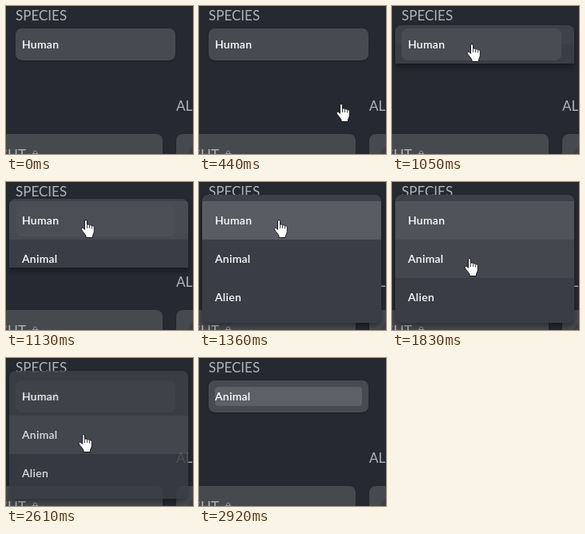
Recreate the animation shown at these times as an HTML page. Size 234 by 185 pixels, loop 4160 ms.

```html
<!DOCTYPE html>
<html lang="en">
<head>
<meta charset="utf-8">
<title>Species select</title>
<style>
  html, body { margin: 0; width: 100%; height: 100%; overflow: hidden; background: #242932; }
  .stage {
    position: relative; width: 234px; height: 185px; overflow: hidden;
    background: #242932; color: #fff;
    font: 600 14px Lato, "Open Sans", sans-serif; letter-spacing: .25px;
  }
  .stage * { position: absolute; box-sizing: border-box; white-space: nowrap; }

  /* Every animated part shares one 4160 ms loop. */
  .anim { animation: 4160ms step-end infinite; }

  .label { font-size: 17px; font-weight: 400; line-height: 20px; letter-spacing: 0; color: #b2b4b8; }
  .card, .field { border-radius: 8px; box-shadow: 0 1px 2px rgba(0, 0, 0, .2); }
  .card { top: 160px; height: 60px; background: #46494e; }
  .knob { left: 14px; top: 14px; width: 28px; height: 28px; border-radius: 50%; background: #3e4147; }

  .field { left: 12px; top: 28px; width: 200px; height: 40px; background: #474a50; }
  .field span { left: 8px; line-height: 40px; }
  .focus { left: 8px; top: 8px; width: 184px; height: 24px; border-radius: 4px; background: #5d6067; animation-name: focus; }
  .before { animation-name: before; }
  .after { animation-name: after; }

  .menu {
    left: 4px; width: 224px; overflow: hidden;
    background: linear-gradient(#3e4149 50%, #3a3d45 0);
    box-shadow: 0 4px 6px rgba(0, 0, 0, .35);
    animation-name: menu;
  }
  .list { left: 0; width: 224px; height: 144px; animation-name: list; }
  .ghost { left: 8px; top: 4px; width: 200px; height: 40px; border-radius: 8px; background: #494c52; animation-name: ghost; }
  .row { left: 0; width: 224px; height: 48px; padding-left: 16px; line-height: 48px; }
  .row:nth-child(2) { top: 0; animation-name: first; }
  .row:nth-child(3) { top: 48px; animation-name: second; }
  .row:nth-child(4) { top: 96px; background: #3a3d45; }

  .pointer { left: 0; top: 0; width: 0; height: 0; animation-name: move; }
  .pulse { left: -12px; top: -12px; width: 24px; height: 24px; border-radius: 50%; background: #a0a12d; animation-name: pulse; }
  .hand { left: -8px; top: -2px; overflow: visible; }

  @keyframes move {
    0% { transform: translate(203px, 147px); opacity: 0; }
    8.65% { transform: translate(203px, 147px); opacity: 1; animation-timing-function: steps(4); }
    16.1% { transform: translate(99px, 47px); opacity: 1; }
    40.38% { transform: translate(98px, 63px); opacity: 1; animation-timing-function: steps(2); }
    43.98% { transform: translate(96px, 95px); opacity: 1; }
    68.26%, 100% { transform: translate(96px, 95px); opacity: 0; }
  }
  @keyframes pulse {
    0% { opacity: 0; }
    21.63% { opacity: 1; }
    25.23% { opacity: 0; }
    60.81% { opacity: 1; }
    62.73%, 100% { opacity: 0; }
  }
  /* The lower corners stay square until the panel is fully open. */
  @keyframes menu {
    0% { top: 24px; height: 48px; opacity: 0; border-radius: 8px 8px 0 0; }
    25.23% { top: 24px; height: 48px; opacity: 1; border-radius: 8px 8px 0 0; }
    27.1% { top: 21px; height: 86px; opacity: 1; border-radius: 8px 8px 0 0; }
    28.95% { top: 18px; height: 126px; opacity: 1; border-radius: 8px 8px 0 0; }
    30.82% { top: 17px; height: 150px; opacity: 1; border-radius: 8px 8px 0 0; }
    32.69%, 60.81% { top: 16px; height: 160px; opacity: 1; border-radius: 8px; }
    62.73% { top: 16px; height: 160px; opacity: .85; border-radius: 8px; }
    64.66% { top: 16px; height: 160px; opacity: .5; border-radius: 8px; }
    66.58% { top: 16px; height: 160px; opacity: .2; border-radius: 8px; }
    68.26%, 100% { top: 16px; height: 160px; opacity: 0; border-radius: 8px; }
  }
  /* Offsets the panel's rise so that the rows stay put. */
  @keyframes list {
    0% { top: 0; }
    27.1% { top: 3px; }
    28.95% { top: 6px; }
    30.82% { top: 7px; }
    32.69%, 100% { top: 8px; }
  }
  @keyframes ghost {
    0% { opacity: 1; }
    27.1% { opacity: .6; }
    28.95% { opacity: .25; }
    30.82%, 100% { opacity: 0; }
  }
  @keyframes first {
    0% { background: #595c6300; }
    27.1% { background: #595c6366; }
    28.95% { background: #595c63b3; }
    30.82% { background: #595c63e6; }
    32.69% { background: #595c63; }
    43.98% { background: #50535a; }
    60.81%, 100% { background: #3e4149; }
  }
  @keyframes second {
    0% { background: #3a3d45; }
    43.98% { background: #44474e; }
    60.81%, 100% { background: #494c53; }
  }
  @keyframes before { 0% { opacity: 1; } 62.73%, 100% { opacity: 0; } }
  @keyframes after { 0% { opacity: 0; } 62.73%, 100% { opacity: 1; } }
  @keyframes focus { 0% { opacity: 0; } 68.26% { opacity: .5; } 70.19%, 100% { opacity: 1; } }
</style>
</head>
<body>
<div class="stage">
  <div class="label" style="left:12px; top:2px">SPECIES</div>
  <div class="label" style="left:213px; top:115px">AL</div>
  <div class="card" style="left:-20px; width:216px"></div>
  <div class="card" style="left:213px; width:60px"><div class="knob"></div></div>
  <div class="label" style="right:209px; top:176px">HEIGHT</div>
  <svg style="left:32px; top:179px" width="10" height="12" fill="none" stroke="#94969a">
    <path d="M2.5 5V4a2 2 0 0 1 4 0v1M1 5.5h7v6H1z"/>
  </svg>

  <div class="field">
    <div class="focus anim"></div>
    <span class="before anim">Human</span>
    <span class="after anim">Animal</span>
  </div>

  <div class="menu anim">
    <div class="list anim">
      <div class="ghost anim"></div>
      <div class="row anim">Human</div>
      <div class="row anim">Animal</div>
      <div class="row">Alien</div>
    </div>
  </div>

  <div class="pointer anim">
    <div class="pulse anim"></div>
    <svg class="hand" width="22" height="27" viewBox="-8 -2 22 27" stroke="#15171b" stroke-linejoin="round">
      <path fill="#fff" d="M-.5 12.4V2a1.5 1.5 0 0 1 3 0V6.5c.7-1 3-.7 3 .8 .7-.9 3-.6 3 .9 .7-.8 2.8-.4 2.8 1.2V14.5c0 2.5-1.8 4-1.8 6.5V22.5H1V20.5C0 18-3 15-4.3 13c-1.2-2 .9-3.6 2.3-2.2z"/>
      <path fill="none" stroke-width=".8" d="M2.5 6.5V11M5.5 7.5V11M8.5 8.5V11.5"/>
    </svg>
  </div>
</div>
</body>
</html>
```
